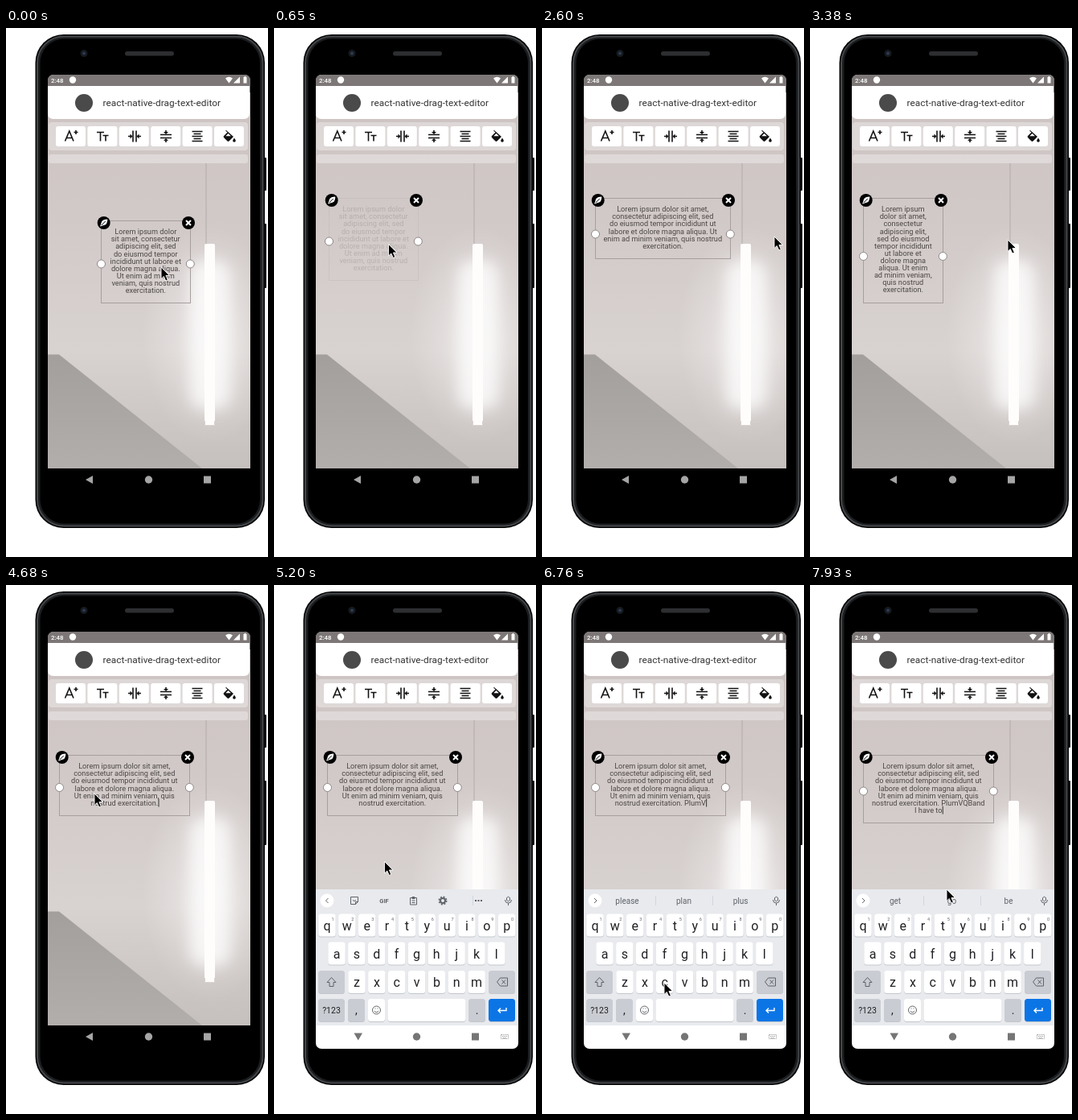
Write an HTML page that moves like this. It is 326 px wide and 657 px high and loops after 8 s.

```html
<!DOCTYPE html>
<html lang="en">
<head>
<meta charset="utf-8">
<title>Drag text editor</title>
<style>
  html, body { margin: 0; width: 100%; height: 100%; overflow: hidden; background: #fff; }
  svg { display: block; width: 326px; height: 657px; font-family: Roboto, sans-serif; }
  .mid text, text.mid { text-anchor: middle; }
  .line { fill: none; stroke: #111; stroke-width: 1.6; }
  .thin { fill: none; stroke: #5f6368; stroke-width: 1; }
</style>
</head>
<body>
<svg viewBox="0 0 326 657" xmlns="http://www.w3.org/2000/svg">
  <defs>
    <clipPath id="screen"><rect x="52" y="58" width="252" height="518" rx="7"/></clipPath>
    <clipPath id="app"><rect x="52" y="58" width="252" height="489"/></clipPath>
    <linearGradient id="wall" x1="0" y1="0" x2="0" y2="1">
      <stop offset="0" stop-color="#cbc2c1"/>
      <stop offset=".35" stop-color="#d1c9c8"/>
      <stop offset=".7" stop-color="#d8d2d0"/>
      <stop offset="1" stop-color="#c5bfbd"/>
    </linearGradient>
    <linearGradient id="stair" x1="0" y1="0" x2="0" y2="1">
      <stop offset="0" stop-color="#a39f9d"/>
      <stop offset="1" stop-color="#b2aeac"/>
    </linearGradient>
    <radialGradient id="glow">
      <stop offset="0" stop-color="#fff"/>
      <stop offset=".35" stop-color="#fff" stop-opacity=".75"/>
      <stop offset="1" stop-color="#fff" stop-opacity="0"/>
    </radialGradient>
    <filter id="soft" x="-1" y="-.2" width="3" height="1.4"><feGaussianBlur stdDeviation="9"/></filter>
  </defs>

  <!-- phone body -->
  <rect x="318" y="161" width="6" height="41" rx="1" fill="#111"/>
  <rect x="318" y="243" width="6" height="80" rx="1" fill="#111"/>
  <rect x="36.5" y="8" width="285.5" height="613" rx="35" fill="#000"/>
  <rect x="39" y="10.5" width="280.5" height="608" rx="33" fill="#1b1d1f" stroke="#44474a" stroke-width="2"/>
  <rect x="42.5" y="13.5" width="273.5" height="602" rx="30" fill="#000"/>
  <circle cx="97" cy="31.500" r="4.500" fill="#17191d"/>
  <circle cx="97" cy="31.500" r="2" fill="#2b3c55"/>
  <rect x="148" y="29" width="61" height="5.500" rx="2.750" fill="#2c2e30"/>

  <g clip-path="url(#screen)">
    <g clip-path="url(#app)">
      <!-- wall and lamp -->
      <rect x="52" y="58" width="252" height="489" fill="url(#wall)"/>
      <ellipse cx="254" cy="381" rx="85" ry="135" fill="url(#glow)" opacity=".45"/>
      <rect x="229" y="288" width="50" height="186" rx="18" fill="#fff" opacity=".75" filter="url(#soft)"/>
      <path d="M52 405.500H66L244 547H52z" fill="url(#stair)"/>
      <path d="M249 168V268" stroke="#b3abaa"/>
      <rect x="247" y="268" width="13" height="226" rx="2" fill="#fffdfc"/>
      <path d="M247.500 488V493.500H259.500V488" fill="none" stroke="#d9d2cf"/>

      <!-- status bar and header -->
      <rect x="52" y="58" width="252" height="22" fill="#7d7877"/>
      <text x="56" y="68" font-size="7.900" font-weight="500" fill="#fff">2:48</text>
      <circle cx="83" cy="64.500" r="4.200" fill="#fff"/>
      <path d="M273 62.500Q277.500 59 282 62.500L277.500 68.500zM291 60.500V68.500H283zM295.500 61h1v-1h2v1h1v7.500h-4z" fill="#fff"/>
      <path d="M52 72H303V106q0 7-7 7H59q-7 0-7-7z" fill="#fff"/>
      <circle cx="97" cy="93" r="11" fill="#4a4a4a"/>
      <text x="120.500" y="97" font-size="11.840" letter-spacing=".05" fill="#333">react-native-drag-text-editor</text>

      <!-- toolbar -->
      <rect x="53" y="117" width="248" height="35" rx="4" fill="#fff" opacity=".32"/>
      <rect x="53" y="157" width="248" height="11" rx="3" fill="#fff" opacity=".32"/>
      <g id="tools" fill="#fff"></g>
      <g class="line">
        <path d="M73.500 140.500 78.800 128 84 140.500M75.300 136.500H82.300M84.500 129.500h5M87 127v5"/>
        <path d="M113 129.500h9M117.500 129v11.500M120.500 133.500h7M124 133v7.500"/>
        <path d="M158 127.500v14M162 127.500v14M152 134.500h4M164 134.500h4"/>
        <path d="M192 132.500h14M192 136.500h14M199 127v4M199 138v4"/>
        <path d="M231.500 128.500h13M233.500 131.500h9M231.500 134.500h13M233.500 137.500h9M231.500 140.500h13"/>
      </g>
      <path d="M154.500 131.500v6l3-3zM165.500 131.500v6l-3-3zM196 129h6l-3 3zM196 140h6l-3-3z" fill="#111"/>
      <path d="M274 127l9 8-5.500 5.500q-1 .8-2 0L271 136q-.8-1 0-2l4.500-4.500-2.500-1.700zM284 136.500q3.600 4.800 0 5.200-3.600-.4 0-5.200z" fill="#111"/>
      <path d="M273.300 134.300l3.200-3.200 3.400 3.200z" fill="#fff"/>

      <!-- editable box -->
      <g id="box">
        <g id="body">
          <rect id="frame" x=".5" y=".5" fill="none" stroke="#a69f9e"/>
          <g id="lines" class="mid" font-size="9.200" fill="#4b4645"></g>
        </g>
        <path id="caret" stroke="#333"/>
        <g transform="translate(3.700 3)">
          <circle r="8" fill="#000"/>
          <path d="M4.600-4.600Q4.500 1 1.500 2.600L-4.600 4.600-2.600-1.500Q-1-4.500 4.600-4.600z" fill="#fff"/>
          <path d="M-3 3 2-2" stroke="#000"/>
        </g>
        <g id="close">
          <circle r="8" fill="#000"/>
          <path d="M-3-3 3 3M3-3-3 3" stroke="#fff" stroke-width="2"/>
        </g>
        <circle id="dotL" cx=".5" r="5" fill="#fff" stroke="#8d8786"/>
        <circle id="dotR" r="5" fill="#fff" stroke="#8d8786"/>
      </g>

      <!-- keyboard -->
      <g id="board">
        <rect x="52" y="378" width="252" height="170" fill="#e8eaee"/>
        <circle cx="66" cy="392" r="8.500" fill="#fff"/>
        <path id="chevron" class="thin"/>
        <path class="thin" d="M289.500 388.500v3q2 2.500 4 0v-3q-2-2.500-4 0zM287.500 391q0 4 4 4t4-4M291.500 395v3"/>
        <g id="icons">
          <g class="thin">
            <path d="M95.500 387.500h9v6l-3 3h-6zM101.500 396.500v-3h3M98 391.500q2 2 4 0M169.500 388.500h8v8.500h-8zM172 387.500h3v2h-3zM171.500 392h4M171.500 394.500h4"/>
            <circle cx="210" cy="392" r="3" stroke-width="2"/>
            <circle cx="210" cy="392" r="4.700" stroke-width="1.500" stroke-dasharray="2 1.690"/>
            <path d="M247.500 386v12" stroke="#d2d5da"/>
          </g>
          <text class="mid" x="137" y="395" font-size="7.500" font-weight="700" fill="#5f6368">GIF</text>
          <path d="M250 391h2v2h-2zM253.500 391h2v2h-2zM257 391h2v2h-2z" fill="#5f6368"/>
        </g>
        <g id="words" class="mid" font-size="10" fill="#5f6368">
          <path d="M141.500 386v12M212.500 386v12" stroke="#d2d5da"/>
          <text x="106" y="396"></text><text x="176.500" y="396"></text><text x="247" y="396"></text>
        </g>
        <g id="keys" class="mid"></g>
        <g class="thin">
          <path d="M71.500 487.500l5.500 6h-3v5h-5v-5h-3z"/>
          <path d="M277.500 493l4-5h9v10h-9zM283.500 490.500l4.500 5M288 490.500l-4.500 5"/>
          <circle cx="127.500" cy="528" r="5"/>
          <path d="M124.800 529q2.700 3.500 5.400 0M125.500 526h1M128.500 526h1"/>
        </g>
        <path d="M289 525v3.500h-10M282 525.500l-3 3 3 3" fill="none" stroke="#fff" stroke-width="1.400"/>
      </g>
    </g>

    <!-- navigation bar -->
    <rect id="nav" x="52" y="547" width="252" height="29"/>
    <g id="navIcons">
      <path id="back"/>
      <circle cx="177.500" cy="561" r="4.700"/>
      <rect x="246" y="556.500" width="9" height="9"/>
      <path id="imeIcon" d="M282.500 558.500h9v5h-9zM284 560.500h6M285 562.500h4" fill="none" stroke="#aaa" stroke-dasharray="1.500 .7"/>
    </g>
  </g>

  <path id="mouse" d="M0 0V14.500L3.300 11.500 5.800 17 8.300 15.900 5.900 10.500H10.500z" fill="#000" stroke="#fff" stroke-width=".9"/>
</svg>

<script>
const LOOP = 8000, TICK = 130;
const $ = id => document.getElementById(id);
const set = (el, attrs) => { for (const k in attrs) el.setAttribute(k, attrs[k]); return el; };
const add = (parent, tag, attrs, text) => {
  const el = set(document.createElementNS('http://www.w3.org/2000/svg', tag), attrs);
  if (text) el.textContent = text;
  return parent.appendChild(el);
};
const show = (el, on) => { el.style.display = on ? '' : 'none'; };

// Linear track: rows of [time, ...values]
function track(rows, t) {
  let i = 0;
  while (i < rows.length - 1 && rows[i + 1][0] <= t) i++;
  const a = rows[i], b = rows[i + 1] || a;
  const p = b === a || t < a[0] ? 0 : (t - a[0]) / (b[0] - a[0]);
  return a.slice(1).map((v, j) => v + (b[j + 1] - v) * p);
}

const POS = [[0, 118, 239], [130, 113, 236], [520, 76, 214], [780, 59, 207], [910, 66, 211]];
const WIDTH = [[1820, 111], [1950, 117], [2210, 132], [2470, 148], [2600, 168], [2730, 172],
  [2860, 156], [2990, 112], [3120, 84], [3250, 94], [3380, 99], [3510, 150], [3770, 157], [4030, 162]];
const MOUSE = [[0, 193, 297], [130, 188, 294], [520, 151, 272], [780, 134, 265], [910, 141, 269],
  [1040, 171, 261], [1430, 172.5, 260], [1690, 177, 260], [1820, 177, 260],
  [2210, 220, 259], [2600, 289, 259], [2730, 280, 260], [2860, 255, 262], [3120, 196, 264],
  [3380, 246, 263], [3640, 268, 261], [4030, 262, 260], [4160, 262, 260],
  [4290, 110, 259], [4940, 110, 259], [5460, 165, 428], [5720, 165, 428], [5980, 116, 426],
  [6240, 152, 494], [6500, 202, 460], [6760, 152, 494], [7020, 177, 460], [7150, 188, 526],
  [7280, 180, 400], [7410, 172, 382], [7930, 170, 378]];
const TYPED = [[5720, 0], [5850, 2], [7020, 8], [7150, 8], [7280, 11], [7410, 13],
  [7540, 13], [7670, 18], [7800, 21]];
const BOARD = [[4680, 198], [4810, 150], [5070, 0]];
const HINTS = [[5850, 'the to this'], [6240, 'please plan plus'], [6890, 'and is the'],
  [7280, 'I the then'], [7410, 'am have was'], [7670, 'a to been'], [7800, 'get go be']];

const WORDS = ('Lorem ipsum dolor sit amet, consectetur adipiscing elit, sed do eiusmod tempor ' +
  'incididunt ut labore et dolore magna aliqua. Ut enim ad minim veniam, quis nostrud exercitation.').split(' ');
const EXTRA = ' PlumVQBand I have to';

// Words per line, by minimum box width
const BREAKS = [[165, '545661'], [150, '545562'], [125, '5254542'], [105, '333343431'],
  [97, '231232323321'], [90, '2312312323221'], [0, '122113222223211']];

function layout(t) {
  const w = Math.round(track(WIDTH, t)[0]);
  const rule = BREAKS.find(b => w >= b[0])[1];
  let at = 0;
  const lines = [...rule].map(n => WORDS.slice(at, at += +n).join(' '));
  const typed = EXTRA.slice(0, Math.floor(track(TYPED, t)[0] + 1e-6));
  lines[lines.length - 1] += typed.slice(0, 11);
  if (typed.length > 11) lines.push(typed.slice(12));
  return { w, lines, h: Math.round(20.4 + 9.1 * lines.length) };
}

function buildKeys() {
  const keys = $('keys');
  const key = (x, y, w, fill) => {
    add(keys, 'rect', { x, y: y + 1, width: w, height: 28, rx: 3.5, fill: '#c3c7cc' });
    add(keys, 'rect', { x, y, width: w, height: 28, rx: 3.5, fill });
  };
  const label = (x, y, size, s, fill = '#202124') => add(keys, 'text', { x, y, 'font-size': size, fill }, s);
  [['qwertyuiop', 66, 408.5], ['asdfghjkl', 78, 443.5], ['zxcvbnm', 103, 479]].forEach(([row, x0, y], r) =>
    [...row].forEach((c, i) => {
      const x = x0 + i * 24.85;
      key(x - 10.7, y, 21.4, '#fff');
      label(x, y + 20, 16, c);
      if (!r) label(x + 7, y + 8, 5.5, String((i + 1) % 10), '#5f6368');
    }));
  const gray = '#c9ccd2';
  [[55, 479, 33, gray], [267, 479, 33, gray], [55, 514, 33, gray], [92, 514, 21, gray], [117, 514, 21, '#fff'],
    [141.5, 514, 97, '#fff'], [242, 514, 21, gray], [267, 514, 33, '#0b75e6']].forEach(k => key(...k));
  label(71.5, 532, 10.5, '?123');
  label(102.5, 533, 14, ',');
  label(252.5, 533, 14, '.');
}

for (let i = 0; i < 6; i++)
  add($('tools'), 'rect', { x: 62 + i * 39.4, y: 122, width: 37, height: 25, rx: 3 });
buildKeys();
const rows = Array.from({ length: 15 }, () => add($('lines'), 'text', {}));
const hintTexts = $('words').querySelectorAll('text');

// Dimmed while pressed, then eased back
function fade(t) {
  if (t < 130 || t >= 1690) return 1;
  if (t < 1300) return .2;
  const p = (t - 1300) / 390;
  return .2 + .8 * (p < .5 ? 2 * p * p : 1 - 2 * (1 - p) * (1 - p));
}

function drawBox(t) {
  const [x, y] = track(POS, t).map(Math.round);
  const { w, lines, h } = layout(t);
  // Side handles follow the height one tick late
  const cy = layout(Math.max(0, t - TICK)).h / 2 + 3;
  set($('box'), { transform: `translate(${x} ${y})` });
  set($('body'), { opacity: fade(t) });
  set($('frame'), { width: w, height: h });
  set($('close'), { transform: `translate(${w - 2} 3)` });
  set($('dotL'), { cy });
  set($('dotR'), { cx: w + .3, cy });
  rows.forEach((row, i) => {
    row.textContent = lines[i] || '';
    set(row, { x: w / 2 + .3, y: 17.2 + i * 9.1 });
  });
  const n = lines.length - 1;
  const cx = w / 2 + rows[n].getComputedTextLength() / 2 + 1;
  set($('caret'), { d: `M${cx} ${9 + n * 9.1}v10` });
  show($('caret'), t >= 4680 && (t < 5200 || t >= 5850));
}

function drawBoard(t) {
  const up = t >= 4810;
  show($('board'), up);
  set($('board'), { transform: `translate(0 ${track(BOARD, t)[0]})` });
  const hint = HINTS.filter(r => r[0] <= t).pop();
  show($('icons'), !hint);
  show($('words'), hint);
  if (hint) hint[1].split(' ').forEach((s, i) => { hintTexts[i].textContent = s; });
  set($('chevron'), { d: hint ? 'M65 389l3 3-3 3' : 'M67.500 389l-3 3 3 3' });
  set($('nav'), { fill: up ? '#fff' : '#000' });
  set($('navIcons'), { fill: up ? '#757575' : '#a5a5a5' });
  set($('back'), { d: up ? 'M99.500 556.500h10.500l-5.250 9z' : 'M99 561l9-5v10z' });
  show($('imeIcon'), up);
}

function draw(t) {
  drawBox(t);
  drawBoard(t);
  const [x, y] = track(MOUSE, t);
  set($('mouse'), { transform: `translate(${x} ${y})` });
}

const start = performance.now();
function frame() {
  const t = (performance.now() - start) % LOOP;
  draw(Math.floor(t / TICK) * TICK);
  requestAnimationFrame(frame);
}
frame();
</script>
</body>
</html>
```
